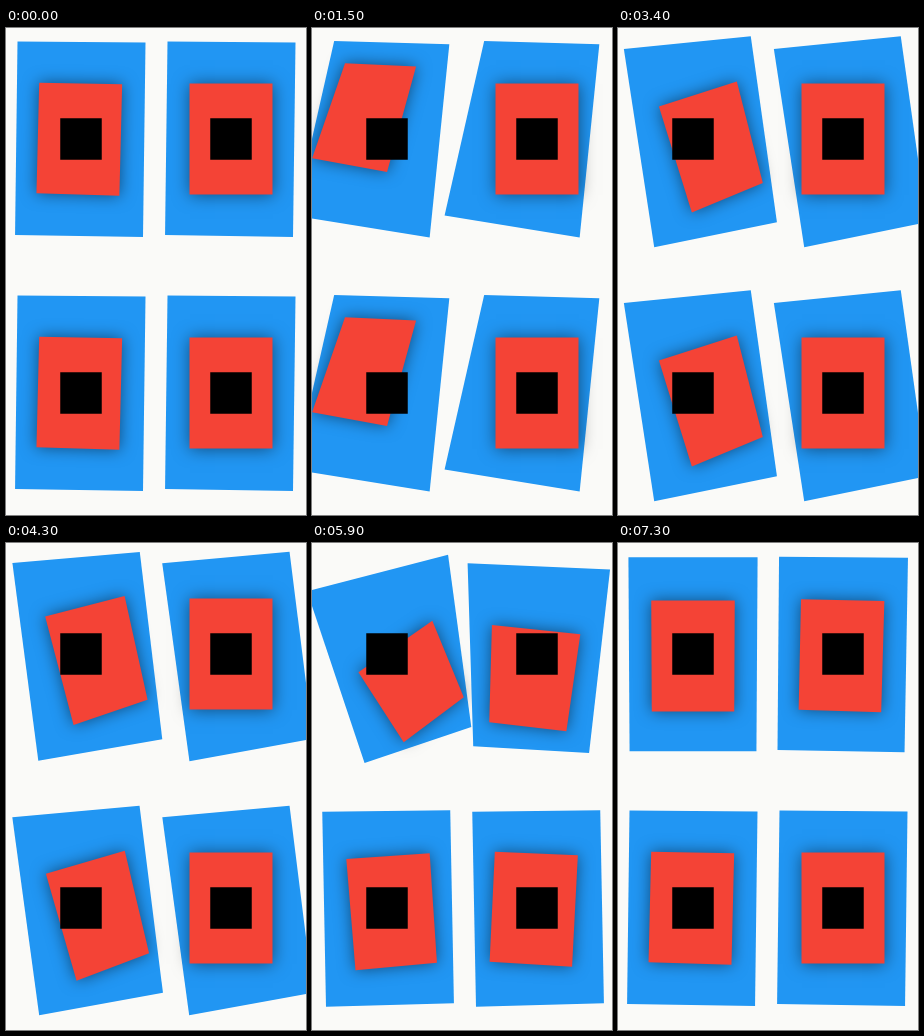
Write an HTML page with a canvas that moves like this. It is 300 px wide and 487 px high and loops after 7.4 s.

```html
<!DOCTYPE html>
<html lang="en">
<head>
<meta charset="utf-8">
<title>Tilting layers</title>
<style>
html, body { margin: 0; width: 100%; height: 100%; overflow: hidden; background: #fafaf8; }
canvas { display: block; width: 100vw; height: 100vh; }
</style>
</head>
<body>
<canvas></canvas>
<script>
const W = 300, H = 487, LOOP = 7400, STEP = 100;
const canvas = document.querySelector('canvas');
const ctx = canvas.getContext('2d');
const ratio = window.devicePixelRatio || 1;
canvas.width = W * ratio;
canvas.height = H * ratio;
ctx.scale(ratio, ratio);

// Shift (px) and turn (radians) of each layer at full tilt.
const BACK = {
  w: 128, h: 194, color: '#2196f3', depth: 0.003,
  shiftX: 23, shiftY: 23.5, turnX: 0.63, turnY: 0.38, turnZ: 0.32
};
const FRONT = {
  w: 83, h: 111, color: '#f44336', depth: 0.0025, shadow: true,
  shiftX: 46, shiftY: 48, turnX: 0.88, turnY: 0.8, turnZ: 0.62
};
const MARK = {
  w: 41.5, h: 41.5, color: '#000', depth: 0,
  shiftX: 0, shiftY: 0, turnX: 0, turnY: 0, turnZ: 0
};

// Tilt keys: time, x, y. The device leans left, up, then right.
const swing = [
  [0, -0.04, 0],
  [800, -0.64, -0.28],
  [1000, -0.65, -0.29],
  [2200, -0.09, -0.95],
  [3200, 0.44, 0.01],
  [3750, 0.48, 0.01],
  [4100, 0.45, 0.01]
];
// The left front layer hangs lower while leaning right.
const sagging = swing.map(([t, x, y]) => [t, x, y + 0.35 * Math.max(0, x)]);
const still = from => [[0, 0, 0], [from, 0, 0]];
const path = (lead, ...tail) => [...lead, ...tail, [LOOP, lead[0][1], lead[0][2]]];

const pressLeft = [[5100, 0.9, 1], [5900, 0.65, 0.67], [7300, 0, 0.05]];
const pressRight = [[5100, -0.13, 0.78], [5900, -0.12, 0.57], [7300, -0.04, 0.04]];
const letGo = [4700, 0.28, 0.05];
const calm = path(swing, [5100, 0.17, 0.02], [5900, 0.06, 0]);

const panels = [
  {
    x: 75, y: 111,
    back: path(swing, letGo, ...pressLeft),
    front: path(sagging, letGo, ...pressLeft)
  },
  {
    x: 225, y: 111,
    back: path(swing, letGo, ...pressRight),
    front: path(still(4700), ...pressRight)
  },
  {
    x: 75, y: 365,
    back: calm,
    front: path(sagging, [5100, 0.3, 0.16], [5900, 0.12, 0.08])
  },
  {
    x: 225, y: 365,
    back: calm,
    front: path(still(4300), [5100, -0.2, 0.07], [5900, -0.08, 0.02], [7300, 0, 0])
  }
];

const touches = [
  { from: [114, 182], to: [122.5, 204.5] },
  { from: [214, 158], to: [216.5, 182.5] }
];

// Monotone cubic interpolation of one coordinate, without overshoot.
function valueAt(keys, t, i) {
  let n = 0;
  while (n < keys.length - 2 && t >= keys[n + 1][0]) n++;
  const [a, b] = [keys[n], keys[n + 1]];
  const span = b[0] - a[0], s = (t - a[0]) / span;
  const rate = j => j < 0 || j > keys.length - 2 ? 0
    : (keys[j + 1][i] - keys[j][i]) / (keys[j + 1][0] - keys[j][0]);
  const slope = j => {
    const l = rate(j - 1), r = rate(j);
    return l * r > 0 ? 2 * l * r / (l + r) : 0;
  };
  return a[i] + (b[i] - a[i]) * s * s * (3 - 2 * s)
    + span * s * (1 - s) * ((1 - s) * slope(n) - s * slope(n + 1));
}

const tiltAt = (keys, t) => [valueAt(keys, t, 1), valueAt(keys, t, 2)];

const rotate = (a, b, angle) => {
  const c = Math.cos(angle), s = Math.sin(angle);
  return [a * c - b * s, a * s + b * c];
};

// Turn about z, y and x, then apply perspective and shift.
function project(layer, x, y, [tx, ty]) {
  let z = 0;
  [x, y] = rotate(x, y, -layer.turnZ * tx);
  [x, z] = rotate(x, z, layer.turnY * tx);
  [y, z] = rotate(y, z, layer.turnX * ty);
  const k = 1 / (1 + layer.depth * z);
  return [x * k + layer.shiftX * tx, y * k + layer.shiftY * ty];
}

function drawLayer(layer, tilt) {
  const x = layer.w / 2, y = layer.h / 2;
  ctx.save();
  if (layer.shadow) {
    ctx.shadowColor = 'rgba(0, 0, 0, 0.5)';
    ctx.shadowBlur = 16 * ratio;
  }
  ctx.fillStyle = layer.color;
  ctx.beginPath();
  for (const [sx, sy] of [[-1, -1], [1, -1], [1, 1], [-1, 1]]) {
    ctx.lineTo(...project(layer, sx * x, sy * y, tilt));
  }
  ctx.closePath();
  ctx.fill();
  ctx.restore();
}

function drawPanel({ x, y, back, front }, t) {
  ctx.save();
  ctx.translate(x, y);
  drawLayer(BACK, tiltAt(back, t));
  drawLayer(FRONT, tiltAt(front, t));
  drawLayer(MARK, [0, 0]);
  ctx.restore();
}

function drawTouch({ from, to }, t) {
  if (t < 4700 || t > 5400) return;
  const k = Math.min(1, (t - 4700) / 400);
  const [x, y] = from.map((v, i) => v + (to[i] - v) * k);
  ctx.beginPath();
  ctx.arc(x, y, 6, 0, Math.PI * 2);
  ctx.fillStyle = 'rgba(255, 255, 255, 0.55)';
  ctx.fill();
  ctx.strokeStyle = 'rgba(205, 212, 212, 0.8)';
  ctx.lineWidth = 1;
  ctx.stroke();
}

function draw(t) {
  ctx.fillStyle = '#fafaf8';
  ctx.fillRect(0, 0, W, H);
  panels.forEach(p => drawPanel(p, t));
  touches.forEach(p => drawTouch(p, t));
}

const start = performance.now();
function frame() {
  const t = (performance.now() - start) % LOOP;
  draw(Math.floor(t / STEP) * STEP);
  requestAnimationFrame(frame);
}
frame();
</script>
</body>
</html>
```
